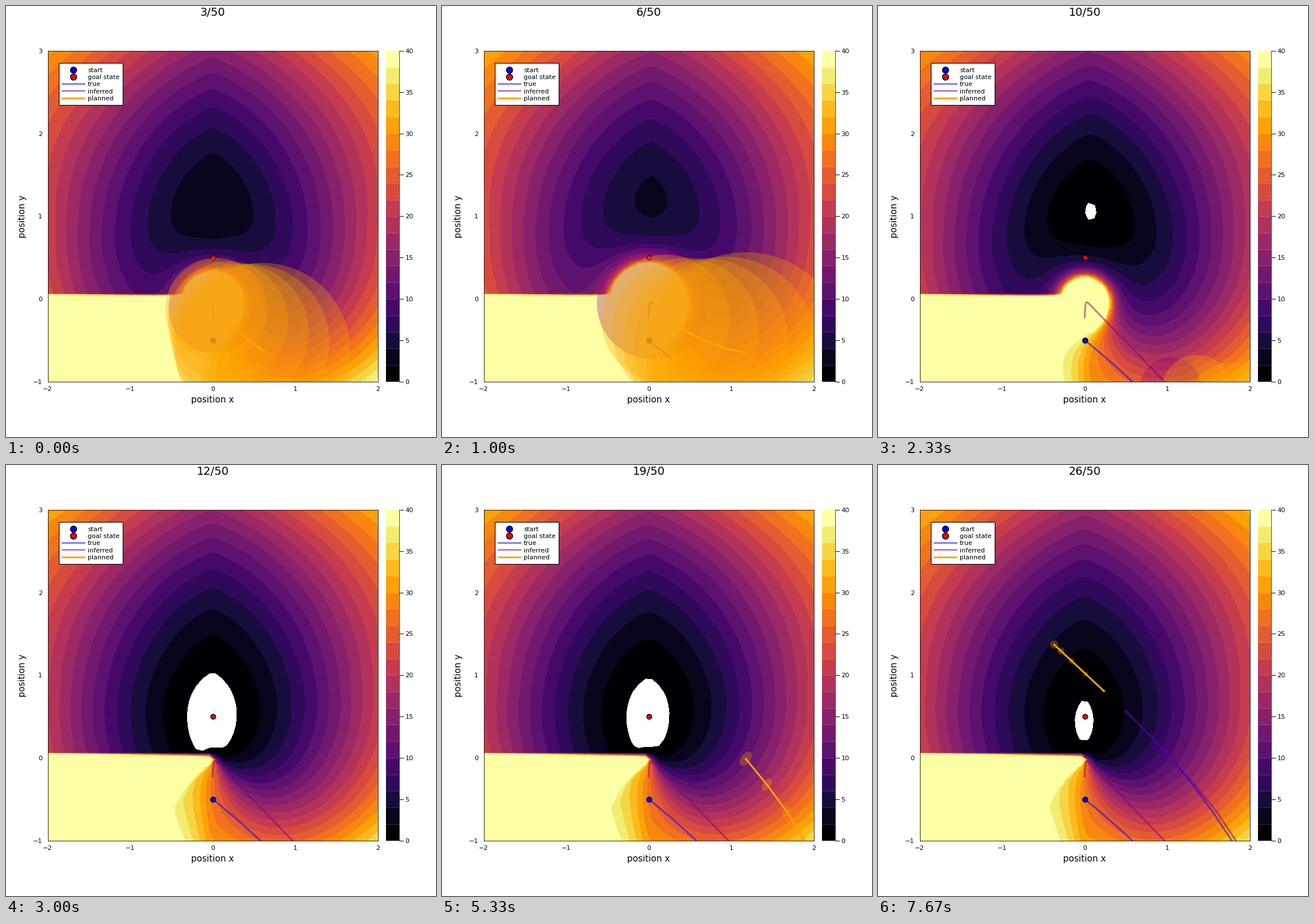
A matplotlib script that plays this animation: 748x749 px, repeating every 8000 ms.

```python
import numpy as np
import matplotlib.pyplot as plt
from matplotlib.animation import FuncAnimation
from matplotlib.patches import Ellipse, Rectangle

W, H, DPI = 748, 749, 100
STEPS, LOOP_MS, TICK_MS = 24, 8000, 50
LEFT, RIGHT, TOP, BOTTOM = 72.5, 646.5, 78, 652.5
PX = 72 / DPI
TURN, BACK, LAST = 9, 16, 23  # steps: leaves the view, heads back, ends
LEVELS = np.append(np.arange(0, 40, 2), 1e6)
COLORS = plt.get_cmap("inferno")(np.linspace(0, 1, 20))
X, Y = np.meshgrid(np.linspace(-2, 2, 50), np.linspace(-1, 3, 50))


def confidence(step):
    """1 while the uncertainty is large, easing to 0 at the turn."""
    return np.clip((TURN - step) / 4, 0, 1) ** 1.2


def progress(step):
    return np.clip((step - BACK) / (LAST - BACK), 0, 1)


def true_out(step):
    x = .05 * step + .0133 * step ** 2
    return np.array([x, -.5 - .8 * x - .12 * x ** 2])


def inferred_out(step):
    x = .006 + .006 * step + .000176 * np.maximum(step, 0) ** 4.44
    return np.array([x, -.005 - 1.03 * x - .22 * np.exp(-x / .008)])


def inbound(left, shift=0):
    """Way back, by the number of steps left until the last one."""
    bend = np.maximum(left, 0) ** 2
    x = .5 + .29 * left - .007 * bend + shift * np.clip(left - 2, 0, 2)
    return np.array([x, .56 - .27 * left - .008 * bend])


def plan(step):
    """Centres and radii of the five planned states."""
    j = np.arange(1, 6)
    t = (j - 1) / 4
    if step < TURN:
        start = inferred_out(step)[0] + .04 * (step + 1)
        x = start + (.56 + .137 * step) * t
        y = -.09 - .75 * start - .65 * t + (.15 + .03 * step) * t ** 2
        return x, y, confidence(step) * (.62 + .053 * step + .44 * t)
    done = progress(step)
    x, y = inbound(LAST - step - j * (1 - .08 * done * j), .025)
    return x + .025 * j * (1 - done), y, (.04 + .06 * t) * (1 - .5 * done)


def cost(step):
    trust = confidence(step)
    strength = np.clip((TURN - step) / 2, 0, 1)
    radius = max(0, min(.34 + .032 * step, .27 + .13 * (7 - step)))
    rise = min(.25 + .39 * step, 2.2 - 2.1 * (step - 5))
    settled = -1.18 + .0042 * (step - TURN) ** 2 - .5 * max(TURN - step, 0)

    # creased basin
    dx = np.abs(X - .01 * step * strength)
    high = np.maximum(Y - .8, 0)
    low = np.maximum(.85 - Y, 0)
    v = max(rise, settled) + 2.45 * (Y - .36 - .2 * trust) ** 2
    v += dx * (1.1 + 1.4 * high) + dx ** 2 * (7 - 1.3 * high) - 1.15 * dx ** 3
    v += 2.2 * dx / (.4 + dx) * low ** 2

    # fan around the tip of the wall, then the wall itself
    angle = np.degrees(np.arctan2(-Y, X - .02))
    v += 34 / (1 + np.exp((65 - angle) / 22))
    v += np.maximum(angle - 130, 0) * (.6 + .6 * np.abs(X))
    v += 8 * np.exp(-np.hypot(X, Y) / .05)

    # soft round obstacle
    gap = np.hypot(X, Y + .03) - radius
    v += strength * (np.minimum(30 * np.exp(-gap / .06), 80) + 14 * np.exp(-gap / .3))
    return v


fig = plt.figure(figsize=(W / DPI, H / DPI), dpi=DPI, facecolor="white")
ax = fig.add_axes([LEFT / W, 1 - BOTTOM / H, (RIGHT - LEFT) / W, (BOTTOM - TOP) / H])
page = fig.add_axes([0, 0, 1, 1], zorder=2)
page.set(xlim=(0, W), ylim=(H, 0))
page.axis("off")


def label(x, y, text, size=8, ha="center"):
    return page.text(x, y + .365 * size / PX, text, fontsize=size, ha=ha,
                     va="baseline", family="DejaVu Sans")


def dot(axes, x, y, color, size, edge):
    axes.plot(x, y, "o", ms=size * PX, mfc=color, mec="black", mew=edge * PX)


def build_axis_labels():
    for k in range(5):
        label(LEFT + k * (RIGHT - LEFT) / 4, 664.5, f"{k - 2}".replace("-", "−"))
        label(63, BOTTOM - k * (BOTTOM - TOP) / 4,
              f"{k - 1}".replace("-", "−"), ha="right")
    label(359.5, 683.5, "position x", 11)
    page.text(29, 365.5, "position y", fontsize=11, rotation=90, ha="center",
              va="center", family="DejaVu Sans")


def build_colorbar():
    band = (BOTTOM - TOP) / 20
    for k, color in enumerate(COLORS):
        y = BOTTOM - (k + 1) * band
        page.add_patch(Rectangle((661, y), 23, band, fc=color, ec="none", aa=False))
        if k < 19:
            page.plot([661, 684], [y, y], color="white", lw=.4, alpha=.35)
    page.plot([684, 684], [TOP, BOTTOM], color="black", lw=.5)
    for value in range(0, 41, 5):
        y = BOTTOM - value / 40 * (BOTTOM - TOP)
        page.plot([684, 691], [y, y], color="black", lw=.7)
        label(694.5, y, str(value), ha="left")


def build_legend():
    page.add_patch(Rectangle((92, 98.5), 111, 73, fc="white", ec="black", lw=.8))
    entries = (("start", "blue"), ("goal state", "red"), ("true", "blue"),
               ("inferred", "purple"), ("planned", "orange"))
    for k, (name, color) in enumerate(entries):
        y = 111 + 12.15 * k
        label(142, y, name, ha="left")
        if k < 2:
            dot(page, 117, y, color, 10.5, 1.6)
        else:
            page.plot([98, 136], [y, y], color=color, lw=3 * PX,
                      alpha=1 if name == "planned" else .5)


build_axis_labels()
build_colorbar()
build_legend()
title = label(359.5, 9.9, "", 14)


def trail(points, color, alpha=.5, zorder=3):
    ax.plot(*points, color=color, alpha=alpha, lw=3 * PX, zorder=zorder)


def cloud(x, y, radius, color, aspect=1):
    ax.add_patch(Ellipse((x, y), 2 * radius, 2 * radius * aspect, angle=55,
                         fc=color, ec="none", alpha=.3, zorder=4))


def draw(tick):
    # steps change at times rounded to whole ticks
    step = int((tick * TICK_MS + 35) * STEPS / LOOP_MS) % STEPS
    caption = f"{step + 3}/50"
    if title.get_text() == caption:
        return []
    title.set_text(caption)

    ax.clear()
    ax.contourf(X, Y, cost(step), levels=LEVELS, colors=COLORS)
    ax.set(xlim=(-2, 2), ylim=(-1, 3), xticks=[], yticks=[])
    for spine in ax.spines.values():
        spine.set_linewidth(.6)
    dot(ax, 0, -.5, "blue", 9, 1.4)
    dot(ax, 0, .5, "red", 8.5, 1.4)

    out = min(step, TURN)
    trail(true_out(np.linspace(0, out, 60)), "blue")
    trail(inferred_out(np.linspace(-1, out, 200)), "purple")
    if step < TURN:
        cloud(*inferred_out(step), confidence(step) * (.54 + .045 * step), "purple")
    else:
        left = np.arange(TURN, LAST - step - 1, -1)
        trail(inbound(left), "blue")
        trail(inbound(left, .025), "purple")
        cloud(*inbound(LAST - step, .025), .02, "purple")

    x, y, radii = plan(step)
    aspect = 1 if step < TURN else .55 + .45 * progress(step)
    for state in zip(x, y, radii):
        cloud(*state, "orange", aspect)
    trail((x, y), "orange", alpha=1, zorder=5)
    return []


anim = FuncAnimation(fig, draw, frames=LOOP_MS // TICK_MS, init_func=lambda: [],
                     interval=TICK_MS, repeat=True, repeat_delay=0)
plt.show()
```
